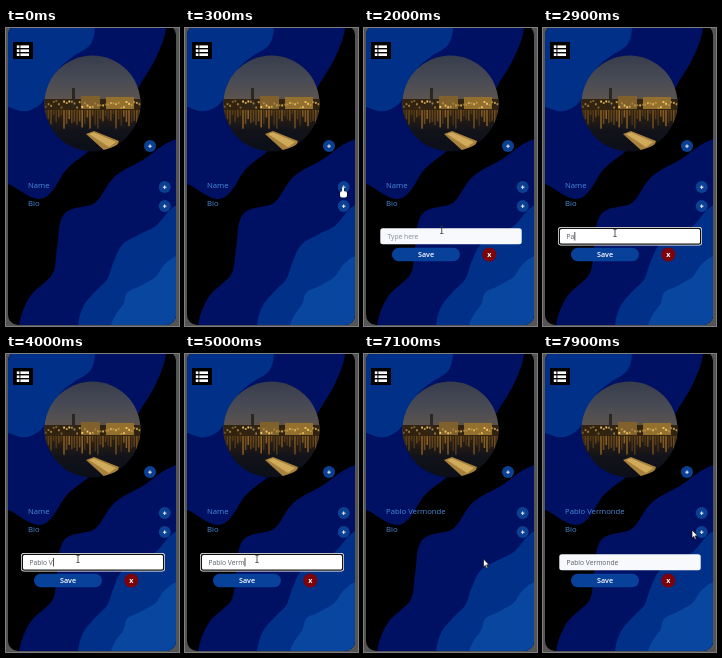
Animation, 173 px wide and 298 px high, one loop 8 s. Source, as an HTML page with a canvas:

```html
<!DOCTYPE html>
<html lang="en">
<head>
<meta charset="utf-8">
<title>Profile editor</title>
<style>
  html, body { margin: 0; width: 100%; height: 100%; overflow: hidden; background: #555; }
  canvas { display: block; width: 173px; height: 298px; }
</style>
</head>
<body>
<canvas id="stage"></canvas>
<script>
const W = 173, H = 298, LOOP = 8000, STEP = 100;
const FONT = '"Open Sans", "Noto Sans", sans-serif';
const NAVY = '#001062', BLUE = '#003088', LIGHT = '#0946a0';
const OPEN = 1400, FOCUS = 2200, SAVE = 7000, REOPEN = 7700;
const canvas = document.getElementById('stage');
const ctx = canvas.getContext('2d');
const ratio = window.devicePixelRatio || 1;
canvas.width = W * ratio;
canvas.height = H * ratio;

// Bursts of one key per step; "<" is backspace
const bursts = [
  [2700, 'P'], [2900, 'ablno<<o'], [3800, ' '], [4000, 'Vermo<<<'],
  [4900, 'rmu<'], [5700, 'on'], [6000, 'de']
];

// Pointer moves: begin, end, x, y
const moves = [
  [0, 300, 158, 159.5], [1500, 2100, 72, 205], [6500, 6700, 64, 226],
  [6900, 7000, 84, 243], [7000, 7100, 119.5, 205],
  [7100, 7500, 158.5, 175], [7700, 7900, 149, 176]
];

const plusButtons = [[144, 118], [158.7, 159], [158.7, 178]];

// Waves around a corner, as radii at equal angles over a quarter turn
const topLeft = { x: 2, y: 0, dir: 1 }, bottomRight = { x: 171, y: 298, dir: -1 };
const waves = [
  [topLeft, NAVY, [158, 151, 144, 143, 143, 147, 153, 174, 156]],
  [topLeft, BLUE, [87, 84, 72, 66, 67, 74, 83, 85, 79]],
  [bottomRight, NAVY, [158, 150, 135, 144, 159, 148, 162, 170, 187]],
  [bottomRight, BLUE, [99, 96, 89, 84, 90, 98, 99, 103, 121]],
  [bottomRight, LIGHT, [66, 62, 58, 60, 55, 53, 54, 63, 70]]
];

function circle(x, y, r, color) {
  ctx.fillStyle = color;
  ctx.beginPath();
  ctx.arc(x, y, r, 0, Math.PI * 2);
  ctx.fill();
}

function rect(x, y, w, h, color) {
  ctx.fillStyle = color;
  ctx.fillRect(x, y, w, h);
}

function box(x, y, w, h, r, color) {
  ctx.beginPath();
  ctx.roundRect(x, y, w, h, r);
  ctx.fillStyle = color;
  ctx.fill();
}

function poly(points, color) {
  ctx.fillStyle = color;
  ctx.beginPath();
  points.forEach(p => ctx.lineTo(...p));
  ctx.closePath();
  ctx.fill();
}

function shade(top, bottom, ...colors) {
  const g = ctx.createLinearGradient(0, top, 0, bottom);
  colors.forEach((c, i) => g.addColorStop(i / (colors.length - 1), c));
  return g;
}

function label(text, x, y, size, color, weight = 400, align = 'left') {
  ctx.font = `${weight} ${size}px ${FONT}`;
  ctx.textAlign = align;
  ctx.fillStyle = color;
  ctx.fillText(text, x, y);
}

function random(seed) {
  return () => (seed = (seed * 16807) % 2147483647) / 2147483647;
}

// Catmull-Rom value at position u in a list
function spline(list, u) {
  const at = i => list[Math.max(0, Math.min(list.length - 1, i))];
  const i = Math.floor(u), k = u - i;
  const [a, b, c, d] = [at(i - 1), at(i), at(i + 1), at(i + 2)];
  return b + k / 2 * (c - a + k * (2 * a - 5 * b + 4 * c - d + k * (3 * (b - c) + d - a)));
}

function drawWave([corner, color, radii]) {
  const points = [[corner.x, corner.y]];
  const last = radii.length - 1;
  for (let u = 0; u <= last; u += 0.125) {
    const angle = u / last * Math.PI / 2, r = spline(radii, u) * corner.dir;
    points.push([corner.x + r * Math.cos(angle), corner.y + r * Math.sin(angle)]);
  }
  poly(points, color);
}

function drawBackground() {
  rect(0, 0, W, H, '#555');
  box(2, -3, 168, 300, 10, '#000');
  ctx.save();
  ctx.clip();
  waves.forEach(drawWave);
  ctx.restore();
}

// Evening harbour in a round frame
function drawPhoto() {
  const rand = random(29);
  ctx.save();
  ctx.beginPath();
  ctx.arc(86.5, 75.5, 48, 0, Math.PI * 2);
  ctx.clip();
  rect(38, 27, 98, 55, shade(28, 72, '#383d4c', '#474a55', '#5c544f'));
  rect(38, 81, 98, 44, shade(81, 124, '#33230f', '#12131a', '#0b0e18'));
  rect(38, 71, 98, 11, '#31230f');
  rect(66, 60, 3, 20, '#2c2620');
  rect(75, 68, 19, 13, '#80602b');
  rect(100, 69, 28, 12, '#94702f');
  for (let x = 39; x < 134; x += 2.6) {
    const glow = 0.3 + rand() * 0.7;
    rect(x, 72 + rand() * 7, 1.8, 2, `rgba(250, 205, 105, ${glow})`);
    rect(x, 82, 1.6, 4 + rand() * 15, `rgba(205, 140, 50, ${glow * 0.6})`);
  }
  poly([[80, 106], [88, 103], [113, 113], [110, 121], [100, 124]], '#a8813c');
  poly([[83, 106], [88, 104.5], [110, 114], [103, 119]], '#d0ab5c');
  ctx.restore();
}

function drawMenu() {
  rect(7, 14, 20, 17, '#000');
  for (let y = 17.4; y < 27; y += 4) {
    rect(10.8, y, 2.6, 2.6, '#fff');
    rect(14.4, y, 8.6, 2.6, '#fff');
  }
}

function drawPlus([x, y]) {
  circle(x, y, 6, '#0b4092');
  rect(x - 1.8, y - 0.3, 3.6, 0.9, '#fff');
  rect(x - 0.45, y - 1.6, 0.9, 3.6, '#fff');
}

function drawForm(s) {
  if (s.focus) {
    box(15, 199, 144, 18.5, 3, '#fff');
    box(15.7, 199.7, 142.6, 17, 2.5, '#101010');
    box(17, 201, 140, 14.5, 1.5, '#fff');
  } else {
    box(16.3, 200.2, 141.4, 16, 2.5, '#f7f9fd');
  }
  label(s.text || 'Type here', 23.5, 211, 6.7, s.text ? '#555b63' : '#858a94');
  if (s.caret) rect(23.7 + ctx.measureText(s.text).width, 204, 0.8, 8.5, '#222');
  box(28, 219.7, 68, 13.6, 6.8, '#08419a');
  label('Save', 62, 229.4, 7.2, '#fff', 600, 'center');
  circle(125.3, 226.5, 7, '#7d0209');
  label('x', 125.3, 229.1, 7.2, '#fff', 700, 'center');
}

function pointerAt(t) {
  let x = 17, y = 22;
  for (const [begin, end, toX, toY] of moves) {
    const p = Math.max(0, Math.min(1, (t - begin) / (end - begin)));
    const k = (1 - Math.cos(p * Math.PI)) / 2;
    x += (toX - x) * k;
    y += (toY - y) * k;
  }
  return [x, y];
}

function pointerKind(x, y, open) {
  if (open && x > 17 && x < 157 && y > 201 && y < 216) return 'text';
  if (open && x > 28 && x < 96 && y > 220 && y < 233) return 'hand';
  return plusButtons.some(([bx, by]) => Math.hypot(x - bx, y - by) < 6) ? 'hand' : 'arrow';
}

function drawPointer(x, y, kind) {
  ctx.save();
  ctx.translate(x, y);
  ctx.lineWidth = 0.7;
  ctx.strokeStyle = '#111';
  if (kind === 'text') {
    rect(-0.4, -3.6, 0.8, 7.2, '#333');
    for (const edge of [-4, 3.3]) rect(-1.7, edge, 3.4, 0.7, '#333');
  } else if (kind === 'hand') {
    ctx.beginPath();
    ctx.roundRect(-0.9, -0.4, 1.9, 7, 0.9);
    ctx.roundRect(-3, 3.7, 7, 6.2, 2);
    ctx.stroke();
    ctx.fillStyle = '#fff';
    ctx.fill();
  } else {
    poly([[0, 0], [0, 8], [1.8, 6.4], [3, 9.2], [4.3, 8.6], [3.1, 5.9], [5.6, 5.8]], '#fff');
    ctx.stroke();
  }
  ctx.restore();
}

function typedAt(t) {
  let text = '';
  for (const [begin, keys] of bursts) {
    const count = Math.max(0, Math.floor((t - begin) / STEP) + 1);
    for (const key of keys.slice(0, count)) {
      text = key === '<' ? text.slice(0, -1) : text + key;
    }
  }
  return text;
}

function stateAt(t) {
  const text = typedAt(t);
  return {
    text,
    open: (t >= OPEN && t < SAVE) || t >= REOPEN,
    focus: t >= FOCUS && t < SAVE,
    caret: t >= FOCUS && t < 6200 && (t < 2500 || text !== ''),
    name: t >= SAVE ? text : 'Name'
  };
}

function draw(t) {
  const s = stateAt(t);
  ctx.setTransform(ratio, 0, 0, ratio, 0, 0);
  drawBackground();
  drawPhoto();
  drawMenu();
  label(s.name, 22, 159.6, 7.7, '#4b8bd8');
  label('Bio', 22, 178.4, 7.7, '#4b8bd8');
  plusButtons.forEach(drawPlus);
  if (s.open) drawForm(s);
  if (t > 0) {
    const [x, y] = pointerAt(t);
    drawPointer(x, y, pointerKind(x, y, s.open));
  }
}

const start = performance.now();
function tick() {
  const t = (performance.now() - start) % LOOP;
  draw(Math.floor(t / STEP) * STEP);
  requestAnimationFrame(tick);
}
tick();
</script>
</body>
</html>
```
